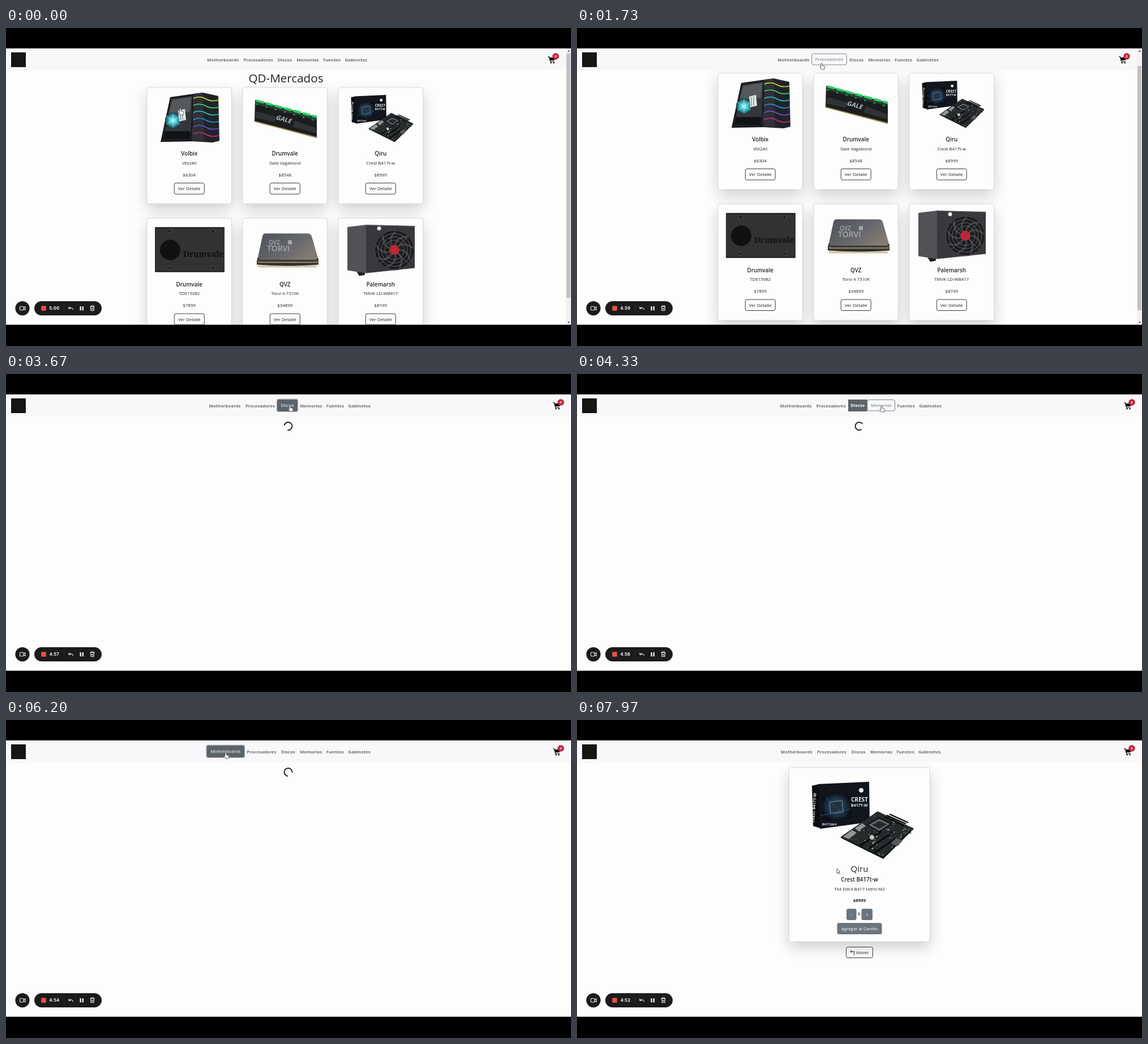
These frames come from a looping animation (998 by 561 pixels, 8000 ms). An HTML page:

```html
<!DOCTYPE html>
<html lang="es">
<head>
<meta charset="utf-8">
<title>QD-Mercados</title>
<style>
html, body { margin: 0; width: 100%; height: 100%; overflow: hidden; background: #000; }
svg { display: block; width: 100vw; height: 100vh; font-family: 'Open Sans', 'Noto Sans', sans-serif; }
</style>
</head>
<body>
<svg viewBox="0 0 998 561">
  <defs>
    <filter id="blur" x="-40%" y="-40%" width="180%" height="180%"><feGaussianBlur stdDeviation="13"/></filter>
    <linearGradient id="metal" x2="1" y2=".6">
      <stop stop-color="#4c5056"/><stop offset=".6" stop-color="#66686d"/><stop offset="1" stop-color="#857a70"/>
    </linearGradient>
    <radialGradient id="glow"><stop stop-color="#9ff"/><stop offset=".6" stop-color="#35a9b8"/><stop offset="1" stop-color="#14343a"/></radialGradient>
    <radialGradient id="chip"><stop stop-color="#6f8aa5"/><stop offset=".45" stop-color="#243e58"/><stop offset="1" stop-color="#0c1119"/></radialGradient>

    <g id="tower">
      <path d="M41 17 83 11 80 95 24 96z" fill="#191b1e"/>
      <path d="M43 20 80 15 77 91 29 92z" fill="#33373b"/>
      <path d="M45 22 78 17 76 43 38 47z" fill="#55595c"/>
      <path d="M32 77h45l-1 14H29z" fill="#121315"/>
      <circle cx="46" cy="58" r="14" fill="url(#glow)"/>
      <path d="M46 45v26M34 51l24 14M34 65l24-14" stroke="#e5ffff" opacity=".55"/>
      <path d="M55 41l12-3 2 19-12 3z" fill="#dfe9e8"/>
      <path d="M59 42v16M63 41v16" stroke="#59676a"/>
      <path d="M83 11 99 9 126 15 128 94 116 97 80 95z" fill="#222327"/>
      <path d="M83 11 99 9 101 95 80 95z" fill="#303136"/>
      <g id="waves" fill="none" stroke-width="1.5"></g>
    </g>

    <g id="memory">
      <path d="M22 22 131 52V89L21 60z" fill="#1b1d1f"/>
      <path d="M22 23 131 53v5L22 29z" fill="#30383a"/>
      <path d="M24 23 131 52" stroke="#20d558" stroke-width="4" stroke-dasharray="14 3"/>
      <path d="M24 29 131 59" stroke="#16963d" stroke-width="3" stroke-dasharray="3 14"/>
      <path d="M24 42 65 53 55 61 22 53zM92 58l38 14v9L88 69z" fill="#303335"/>
      <path d="M22 60 131 88" stroke="#b49c56" stroke-width="2" stroke-dasharray="2 .6"/>
      <text transform="translate(58 56) rotate(15) skewX(-12)" font-size="11" font-weight="700" fill="#b9bcbf">GALE</text>
    </g>

    <g id="board">
      <path d="M0 7 13 4 15 82 2 78z" fill="#0b0d11"/>
      <path d="M12 4 101 0 102 71 14 83z" fill="#11161d"/>
      <path d="M17 28 67 18 69 65 19 69z" fill="url(#chip)"/>
      <path d="M31 36l22-3 2 20-22 3z" fill="#27313c" stroke="#7591a8"/>
      <path d="M15 60l52-12M25 28l35 34" stroke="#27659e" stroke-width=".8"/>
      <g fill="#e8edf0" font-weight="700">
        <text x="69" y="35" font-size="10">CREST</text>
        <text x="69" y="44" font-size="7">B417T-W</text>
        <text x="18" y="77" font-size="5">B417 Ddr4</text>
        <text transform="translate(4 72) rotate(-86)" font-size="7">CREST B417T-W</text>
      </g>
      <circle cx="87" cy="15" r="4" fill="#e8edf0"/>
      <path d="M51 97 116 52 179 82 126 135z" fill="#252a2b"/>
      <path d="M51 97 126 133 179 81v3L126 136 51 99z" fill="#0c0e0f"/>
      <g id="parts"></g>
      <path d="M98 76 119 64 140 74 119 88z" fill="#65696b" stroke="#0c0d0e" stroke-width="2"/>
      <path d="M106 76l13-7 14 6-14 8z" fill="#24292b"/>
      <path d="M128 62l34 15M132 59l34 15M137 57l33 15" stroke="#080a0b" stroke-width="2.4"/>
      <path d="M85 113l38-26M99 119l38-26M111 125l38-26" stroke="#080a0b" stroke-width="3"/>
      <path d="M55 97l16-12 8 5-14 11zM76 82l13-9 6 5-13 9z" fill="#929594"/>
      <path d="M139 108l10-9 11 5-9 10z" fill="#545a5d"/>
      <circle cx="106" cy="98" r="4" fill="#c4c7c7"/>
    </g>

    <g id="drive">
      <rect x="14" y="16" width="123" height="79" rx="2" fill="#303234"/>
      <path d="M14 17h123M14 94h123" stroke="#1e2021" stroke-width="2"/>
      <g fill="#17191a" stroke="#515355"><circle cx="40" cy="23" r="3"/><circle cx="117" cy="23" r="3"/><circle cx="40" cy="88" r="3"/><circle cx="117" cy="88" r="3"/></g>
      <circle cx="41" cy="56" r="18" fill="#101112"/>
      <text x="64" y="68" font-family="'Noto Serif',serif" font-size="14" font-weight="700" fill="#101112">Drumvale</text>
    </g>

    <g id="processor">
      <path d="M28 85h103" stroke="#b6a178" stroke-width="4" stroke-dasharray="1.5 1"/>
      <path d="M25 74h109v8q-54 4-109 0z" fill="#303030"/>
      <path d="M27 75h106v4H27z" fill="#8d7d59"/>
      <path d="M40 27h75q5 0 7 5l11 38q1 6-6 6H31q-6 0-4-7l8-37q1-5 5-5z" fill="url(#metal)"/>
      <path d="M27 70q0 5 5 5h96q4 0 5-4" fill="none" stroke="#34363a" stroke-width="3"/>
      <g fill="#a4a6aa" font-weight="600"><text x="46" y="46" font-size="10">QVZ</text><rect x="80" y="39" width="7" height="7"/><text x="43" y="58" font-size="14">TORVI</text></g>
    </g>

    <g id="supply">
      <path d="M31 92h16v8l-10 2z" fill="#1e2022"/>
      <path d="M16 16 49 12V97L16 92z" fill="#505256"/>
      <path d="M49 12 135 14V88L49 97z" fill="#37393c"/>
      <path d="M16 16 49 12 135 14" fill="none" stroke="#66686b"/>
      <circle cx="99" cy="56" r="36" fill="#1c1d1f"/>
      <path id="blades" fill="none" stroke="#404246" stroke-width="3"/>
      <g fill="none" stroke="#717377" stroke-width=".8"><circle cx="99" cy="56" r="35"/><circle cx="99" cy="56" r="29"/><circle cx="99" cy="56" r="23"/><circle cx="99" cy="56" r="17"/><path d="M74 31l50 50M124 31l-50 50"/></g>
      <circle cx="99" cy="56" r="9" fill="#b72a36"/>
      <circle cx="72" cy="18" r="3.5" fill="#e8e8e8"/>
    </g>
  </defs>
  <g id="stage"></g>
</svg>
<script>
const $ = id => document.getElementById(id);
const DARK = '#212529', GRAY = '#6c757d', LOOP = 8000;

// Repeated details of the product pictures
$('waves').innerHTML = ['#d6e52e', '#39df77', '#25cfd0', '#2795e6', '#6654e0', '#d5278f'].map((c, i) => {
  const y = 19 + i * 12.5;
  return `<path stroke="${c}" d="M82 ${y}q12-5 22 1t23 2"/>`;
}).join('');
let seed = 7;
const random = () => (seed = seed * 16807 % 2147483647) / 2147483647;
$('parts').innerHTML = Array.from({ length: 90 }, () => {
  const u = .04 + random() * .9, v = .04 + random() * .9;
  const x = 51 + 64 * u + 74 * v, y = 97 - 44 * u + 36 * v - 7 * u * v;
  const c = ['#777d7c', '#a5a18d', '#111516', '#464d50'][random() * 4 | 0];
  return `<rect x="${x}" y="${y}" width="${1 + random() * 3}" height="${1 + random() * 2}" fill="${c}"/>`;
}).join('');
$('blades').setAttribute('d', Array.from({ length: 9 }, (_, i) => {
  const p = (r, a) => `${99 + r * Math.cos(a)} ${56 + r * Math.sin(a)}`, a = i * Math.PI * 2 / 9;
  return `M${p(9, a)}Q${p(23, a)} ${p(33, a + .6)}`;
}).join(''));

const products = {
  tower: ['Volbix', 'Vbt240', '$6304'],
  memory: ['Drumvale', 'Gale Vagabond', '$8548'],
  board: ['Qiru', 'Crest B417t-w', '$8999'],
  drive: ['Drumvale', 'TD615V82', '$7899'],
  processor: ['QVZ', 'Torvi 4 7310K', '$34899'],
  supply: ['Palemarsh', 'TMVK LD-WB417', '$8749']
};

// label, plain width, button width
const nav = [['Motherboards', 64, 66.5], ['Procesadores', 60.5, 62.5], ['Discos', 33.5, 36],
  ['Memorias', 47, 49.5], ['Fuentes', 38.5, 41], ['Gabinetes', 47, 50.5]];

// time, page, focused item, hovered item
const states = [
  [0, 'home', -1, -1], [1250, 'home', -1, 0], [1600, 'home', -1, 1],
  [1830, 'loading', 1, -1], [2330, 'processor', 1, -1], [2990, 'processor', 1, 2],
  [3370, 'loading', 2, -1], [3870, 'drive', 2, 3],
  [4310, 'loading', 2, 3], [4370, 'loading', 3, -1], [4800, 'memory', 3, -1], [4950, 'memory', 3, 5],
  [5300, 'loading', 5, -1], [5750, 'loading', 5, 0], [5800, 'tower', 5, 0],
  [6100, 'loading', 0, -1], [6600, 'board', 0, -1],
  [7250, 'loading', -1, -1], [7700, 'detail', -1, -1]
];

// time, x, y of the pointer
const pointer = [
  [0, 308, 142], [700, 308, 142], [1300, 385, 62], [1730, 432, 62], [1900, 442, 58], [2600, 446, 57],
  [2970, 500, 55], [3270, 497, 55], [3600, 497, 55], [3950, 538, 56], [4600, 538, 56], [5050, 622, 56],
  [5320, 622, 56], [5500, 492, 58], [5800, 388, 57], [6250, 388, 57], [6900, 482, 245], [7070, 479, 256],
  [7350, 479, 256], [7600, 459, 262], [LOOP, 459, 262]
];

const clamp = v => Math.max(0, Math.min(1, v));
const ease = v => v * v * (3 - 2 * v);
const text = (x, y, s, size = 7.85, weight = 400, fill = DARK, more = '') =>
  `<text x="${x}" y="${y + size * .36}" font-size="${size}" font-weight="${weight}" fill="${fill}" text-anchor="middle" ${more}>${s}</text>`;
const box = (x, y, w, h, fill, stroke = 'none', r = 3, more = '') =>
  `<rect x="${x}" y="${y}" width="${w}" height="${h}" rx="${r}" fill="${fill}" stroke="${stroke}" ${more}/>`;
const panel = (x, y, w, h) =>
  box(x, y + 10, w, h, '#000', 'none', 3, 'opacity=".18" filter="url(#blur)"') + box(x, y, w, h, '#fdfdfd', '#d9d9df');

function card(id, x, y, hover = 0) {
  const [name, model, price] = products[id], cx = x + 74.75;
  const place = id === 'board' ? `translate(${x + 22.5} ${y + 13}) scale(.612)` : `translate(${x} ${y})`;
  const shade = Math.round(33 + hover * 190);
  return panel(x, y, 149.5, 205) + `<use href="#${id}" transform="${place}"/>` +
    text(cx, y + 116.5, name, 9.8, 600) + text(cx, y + 133, model) + text(cx, y + 154, price) +
    box(cx - 26.5, y + 168.5, 53, 19.5, `rgba(33,37,41,${hover})`, DARK, 3, 'stroke-width=".9"') +
    text(cx, y + 178.3, 'Ver Detalle', 7.85, 400, `rgb(${shade},${shade},${shade})`);
}

function home(t) {
  const scroll = 25 * ease(clamp((t - 250) / 300));
  return text(494.5, 89 - scroll, 'QD-Mercados', 20.6, 500) +
    Object.keys(products).map((id, i) => card(id, 249 + i % 3 * 169, 105 + (i / 3 | 0) * 230.5 - scroll)).join('') +
    box(989, 36, 9, 488, '#f1f1f1', 'none', 0) + box(990, 45 + scroll * .88, 7, 431, '#c1c1c1', 'none', 0) +
    '<path d="M992 42l2-3 2 3zM992 518l2 3 2-3z" fill="#555"/>';
}

function detail() {
  const [name, model, price] = products.board;
  return panel(374.5, 84, 248.5, 307) + '<use href="#board" transform="translate(415 109)"/>' +
    text(499, 263, name, 15, 500) + text(499, 281.5, model, 9.8, 600) +
    text(499, 298, 'Tk4 Ddr4 B417 Hdmi M2') + text(499, 318.5, price, 7.85, 700) +
    box(476, 333, 17.5, 20, GRAY) + text(484.7, 343, '-', 7.85, 400, '#fff') + text(498, 342.5, '1', 7.85, 700) +
    box(502.5, 333, 19.5, 20, GRAY) + text(512.2, 343, '+', 7.85, 400, '#fff') +
    box(459.5, 358, 79, 20, GRAY) + text(499, 368, 'Agregar al Carrito', 7.85, 400, '#fff') +
    box(475.5, 400.5, 47, 19, 'none', DARK, 3, 'stroke-width=".9"') + text(504, 410, 'Volver') +
    `<path d="M485.5 406l-2.5 2.5 2.5 2.5M483 408.5h6.5v6" fill="none" stroke="${DARK}"/>`;
}

function spinner(elapsed) {
  return `<path d="M503.5 97a7 7 0 1 1 0-10" fill="none" stroke="${DARK}" stroke-width="2" transform="rotate(${elapsed * .48} 498.5 92)"/>`;
}

function navbar(focus, hover, blurring, center, cartX) {
  const isButton = i => i === hover || i === focus && !blurring;
  const widths = nav.map((n, i) => n[isButton(i) ? 2 : 1]);
  let x = center - widths.reduce((a, b) => a + b) / 2;
  let out = box(0, 36, 998, 39, '#f8f8fa', 'none', 0) + box(9, 43, 26, 26, '#151515', 'none', 0);
  nav.forEach(([label], i) => {
    const w = widths[i], cx = x + w / 2;
    if (i === focus) {
      if (!blurring) out += box(x - 1.3, 43.5, w + 2.6, 23.5, '#b5babe', 'none', 4);
      out += box(x, 45, w, 21, '#5c636a', 'none', blurring ? 0 : 3) + text(cx, 55.6, label, 7.85, blurring ? 700 : 400, '#fff');
    } else if (i === hover) {
      out += box(x + .5, 45.5, w - 1, 19.5, 'none', GRAY, 3, 'stroke-width=".9"') + text(cx, 55.6, label, 7.85, 400, GRAY);
    } else out += text(cx, 56, label, 7.85, 700, '#707174');
    x += w;
  });
  return out + `<g transform="translate(${cartX} 50)"><path d="M0 0h2.5l.6 2H13l-1.6 5H4.5l.4 1.4h6.6v1.2H3.8L1.6 1.2H0z"/>
    <circle cx="5.3" cy="11.2" r="1.2"/><circle cx="10.3" cy="11.2" r="1.2"/><circle cx="13.7" cy="0" r="5.8" fill="#c3233f"/>
    ${text(13.7, 0, '0', 6, 700, '#fff')}</g>`;
}

function recorder(t) {
  const left = 300 - Math.floor((t + 40) / 1000);
  const time = `${left / 60 | 0}:${String(left % 60).padStart(2, '0')}`;
  return `<circle cx="29" cy="494.5" r="12.6" fill="#1b1b1d"/>` + box(50, 482, 119, 25, '#1b1b1d', 'none', 12.5) +
    box(62.3, 490.3, 8.5, 8.5, '#e8533f', 'none', 1) +
    text(85.5, 494.6, time, 7.3, 700, '#fff', 'font-family="Inter,sans-serif" letter-spacing=".3"') +
    `<path d="M102.5 488v13" stroke="#333" stroke-width=".8"/>
    <g fill="none" stroke="#eee" stroke-width="1.1"><rect x="24.5" y="491.3" width="6.5" height="6.5" rx="1"/><path d="M31 493.5l3-1.7v5.5l-3-1.7"/>
    <path d="M111 491.5v3.5h3.5M111.3 494.7q4.5-3.5 7.5 2.3"/><path d="M148.5 491.5h8M150.5 491.3v-1.3h4v1.3M149.5 492l.5 6.5h5l.5-6.5M151.7 493.7v3M153.4 493.7v3"/></g>
    <path d="M130.5 491h2.2v7.3h-2.2zM134.7 491h2.2v7.3h-2.2z" fill="#fff"/>`;
}

function cursor(t) {
  const i = pointer.findIndex(p => p[0] > t), [t0, x0, y0] = pointer[i - 1], [t1, x1, y1] = pointer[i];
  const k = ease((t - t0) / (t1 - t0));
  const arrow = t > 800 && t < 1250 || t > 6320 && t < 6900 || t > 7350;
  const shape = arrow ? 'M0 0v8.5l2-1.8 1.4 2.8 1.2-.6-1.3-2.7h2.5z'
    : 'M0 0c1 0 1.2.7 1.2 1.4v3l3.5.9c1 .3 1.2 1 1 1.9l-.8 3.8H0l-2.8-3.8c-.5-1 .6-1.6 1.3-1l.4.5V1.4C-1.1.7-.9 0 0 0z';
  return `<path d="${shape}" transform="translate(${x0 + (x1 - x0) * k} ${y0 + (y1 - y0) * k})" fill="#fff" stroke="#333" stroke-width=".75"/>`;
}

function render(t) {
  const i = states.findLastIndex(s => s[0] <= t), [, page, focus, hover] = states[i];
  let first = i;
  while (first && states[first - 1][1] === page) first--;
  const isHome = page === 'home';
  const body = isHome ? home(t) : page === 'detail' ? detail()
    : page === 'loading' ? spinner(t - states[first][0])
    : card(page, 421.75, 80, page === 'board' ? clamp((t - 6965) / 150) : 0);
  const blurring = page === 'loading' && focus === 2 && hover === 3;
  $('stage').innerHTML = box(0, 36, 998, 488, '#fdfdfc', 'none', 0) + body +
    `<g ${isHome ? 'clip-path="inset(0 9px 0 0)"' : ''}></g>` +
    navbar(focus, hover, blurring, isHome ? 496.5 : 501, isHome ? 957.3 : 966.3) +
    (isHome ? box(989, 36, 9, 39, '#f1f1f1', 'none', 0) + box(990, 45 + 22 * ease(clamp((t - 250) / 300)), 7, 431, '#c1c1c1', 'none', 0) + '<path d="M992 42l2-3 2 3z" fill="#555"/>' : '') +
    cursor(t) + recorder(t) + box(0, 0, 998, 36, '#000', 'none', 0) + box(0, 523.5, 998, 38, '#000', 'none', 0);
}

const start = performance.now();
function tick() {
  render((performance.now() - start) % LOOP);
  requestAnimationFrame(tick);
}
tick();
</script>
</body>
</html>
```
